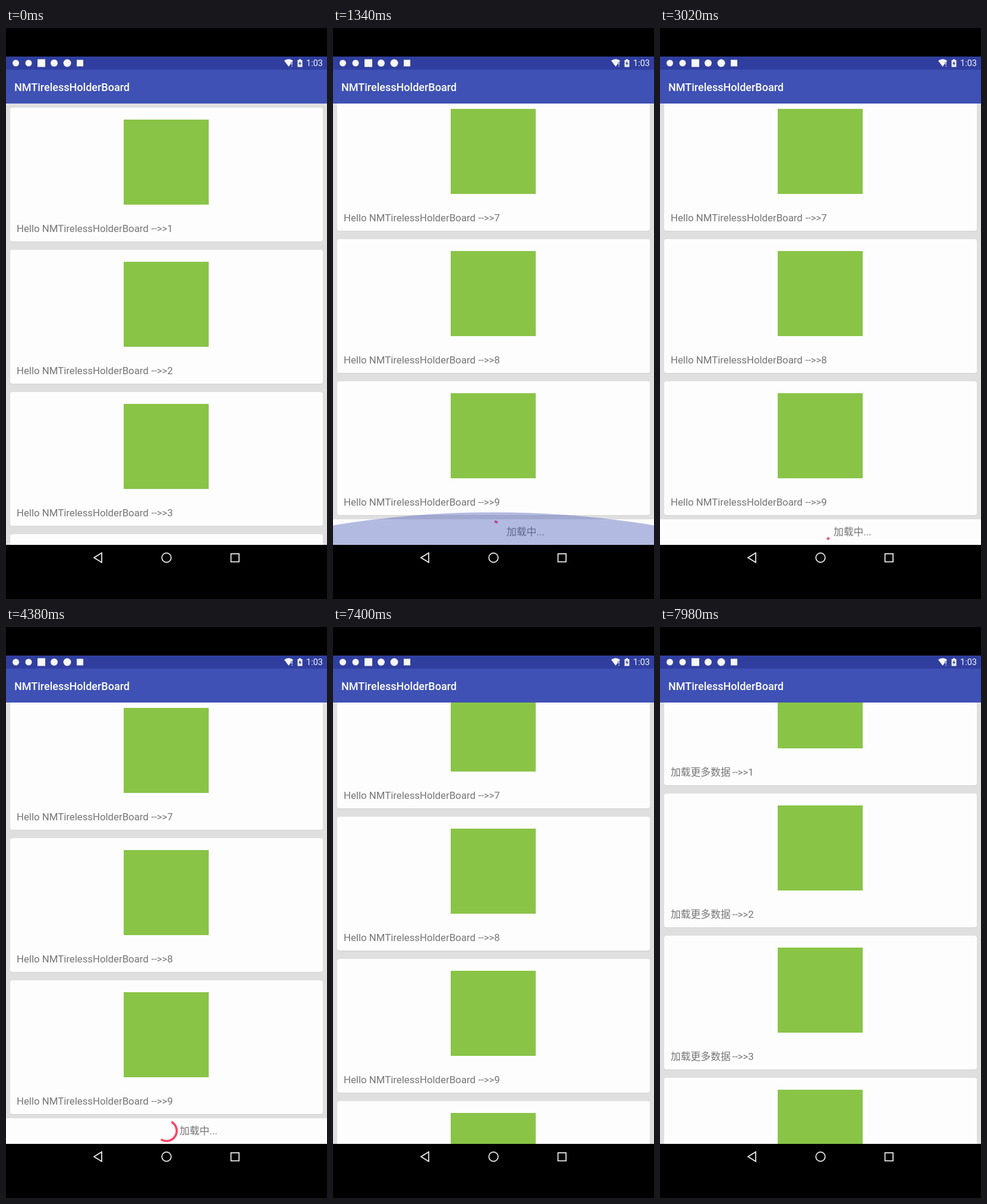
Write an HTML page that moves like this. It is 540 px wide and 960 px high and loops after 8000 ms.

```html
<!DOCTYPE html>
<html>
<head>
<meta charset="utf-8">
<style>
html, body { margin: 0; width: 100%; height: 100%; overflow: hidden; background: #000; }
svg { display: block; width: 540px; height: 960px; }
text { font-family: Roboto, "Noto Sans CJK SC", "Noto Sans CJK", sans-serif; }
.item { font-size: 16.8px; fill: #757575; }
</style>
</head>
<body>
<svg viewBox="0 0 540 960">
  <defs>
    <clipPath id="view"><rect y="127" width="540" height="742"/></clipPath>
  </defs>
  <rect width="540" height="960"/>
  <g clip-path="url(#view)">
    <rect y="127" width="540" height="742" fill="#e0dfe0"/>
    <g id="list">
      <g id="first"></g>
      <g id="more"></g>
      <g id="footer">
        <rect y="2278" width="540" height="43" fill="#fdfdfd"/>
        <circle id="spin" cx="270" cy="2299" r="17.2" pathLength="360" fill="none"
          stroke="#fd4466" stroke-width="3.7" stroke-linecap="square"/>
        <text class="item" x="292" y="2305">加载中...</text>
      </g>
    </g>
    <path id="glow" d="M0 -33Q270 -77 540 -33V0H0Z" fill="#3f51b5"/>
  </g>

  <rect y="48" width="540" height="22" fill="#303f9f"/>
  <rect y="70" width="540" height="57" fill="#3f51b5"/>
  <text x="14" y="105.5" font-size="18" font-weight="500" fill="#fff">NMTirelessHolderBoard</text>

  <g fill="#f6f6f6">
    <circle cx="16.5" cy="59" r="5.5"/>
    <circle cx="38" cy="59" r="5.5"/>
    <rect x="53" y="52.5" width="13" height="13"/>
    <circle cx="81" cy="59" r="6"/>
    <circle cx="103" cy="59" r="6.5"/>
    <rect x="119" y="53.5" width="11" height="11"/>
    <path d="M468 55Q475.5 49.5 483 55L475.5 65Z"/>
    <path d="M490.5 54H492.8V52.5H496.2V54H498.5V65.5H490.5Z"/>
    <text x="505" y="64.3" font-size="14.5">1:03</text>
  </g>
  <path d="M481 57V62M481 63.5V65" stroke="#303f9f" stroke-width="3"/>
  <path d="M481 57V62M481 63.5V65" stroke="#f6f6f6" stroke-width="1.4"/>
  <path d="M495.3 55L492 60.3H494.2L493.7 64L497 58.8H494.8Z" fill="#303f9f"/>

  <g fill="none" stroke="#f4f4f4" stroke-width="1.7">
    <path d="M148 890.5L161 882.5V898.5Z"/>
    <circle cx="270" cy="890.5" r="7.8"/>
    <rect x="378.5" y="884" width="13.5" height="13.5"/>
  </g>
</svg>
<script>
const LOOP = 8000, END = 1452;
// Times below are in ticks; a tick is 1/30 s of phone time.
const RELEASE = 7, DRAGGED = 158, HIT = 24.5, SPIN_START = 25, SPIN_TICKS = 40;
const LOADED = 145, SECOND = 147;
const $ = id => document.getElementById(id);
const clamp = x => Math.max(0, Math.min(1, x));
const decelerate = x => 1 - (1 - clamp(x)) ** 2;

function card(i, label, labelEnd, number) {
  const y = 134 + 239 * i;
  return `<rect x="7" y="${y + 1}" width="526" height="225" rx="4" fill="#d2d1d2"/>
    <rect x="7" y="${y}" width="526" height="225" rx="4" fill="#fdfdfd"/>
    <rect x="198" y="${y + 20}" width="143" height="143" fill="#89c447"/>
    <text class="item" x="18" y="${y + 209}">${label}</text>
    <text class="item" x="${labelEnd}" y="${y + 209}">--&gt;&gt;${number}</text>`;
}
const nine = [...Array(9).keys()];
$('first').innerHTML = nine.map(i => card(i, 'Hello NMTirelessHolderBoard', 244.5, i + 1)).join('');
$('more').innerHTML = nine.map(i => card(i + 9, '加载更多数据', 121.5, i + 1)).join('');

// Ticks come in threes, lasting 20, 20 and 100 ms.
const ticks = u => Math.floor(u / 140) * 3 + Math.min(2, Math.floor(u % 140 / 20));

function tickAt(t) {
  if (t < 180) return 0;
  if (t < 7400) return Math.min(SECOND - 1, 1 + ticks(t - 180));
  return SECOND + ticks(t - 7400);
}

// Distance a fling still covers when it has r seconds left.
const coast = r => 778 * Math.max(0, r) ** 2.358;
const fling = (n, seconds) => coast(seconds) - coast(seconds - n / 30);

function scrollAt(n) {
  if (n < RELEASE) return DRAGGED * (n / RELEASE) ** 3;
  if (n < SECOND) return Math.min(END, DRAGGED + fling(n - RELEASE, 1.438));
  return END + 36 + fling(n - SECOND, 1.177);
}

// cubic-bezier(.4, 0, .2, 1)
function ease(x) {
  let lo = 0, hi = 1, s;
  for (let i = 0; i < 16; i++) {
    s = (lo + hi) / 2;
    if (1.2 * s * (1 - s) ** 2 + 0.6 * s * s * (1 - s) + s ** 3 < x) lo = s;
    else hi = s;
  }
  return s * s * (3 - 2 * s);
}

function drawSpinner(n) {
  const turn = Math.max(0, (n - SPIN_START) / SPIN_TICKS);
  const p = turn % 1;
  const tail = 270 * ease(clamp(p * 2 - 1)), head = 270 * ease(clamp(p * 2));
  const start = 144 * Math.floor(turn) + 234 * p + tail;
  const sweep = Math.max(2, head - tail);
  $('spin').setAttribute('stroke-dasharray', `${sweep} ${360 - sweep}`);
  $('spin').setAttribute('transform', `rotate(${start - 90} 270 2299)`);
}

// The edge glow swells when the fling hits the end, then recedes for 600 ms.
function drawGlow(n) {
  const swell = 2.7;
  const g = decelerate((n - HIT) / swell) * (1 - decelerate((n - HIT - swell) / 18));
  $('glow').setAttribute('transform', `translate(0 869) scale(1 ${g})`);
  $('glow').setAttribute('opacity', 0.39 * g);
}

function draw(t) {
  const n = tickAt(t), loaded = n >= LOADED;
  $('list').setAttribute('transform', `translate(0 ${-Math.round(scrollAt(n))})`);
  $('footer').setAttribute('display', loaded ? 'none' : 'inline');
  $('more').setAttribute('display', loaded ? 'inline' : 'none');
  drawSpinner(n);
  drawGlow(n);
}

const began = performance.now();
function loop() {
  draw((performance.now() - began) % LOOP);
  requestAnimationFrame(loop);
}
loop();
</script>
</body>
</html>
```
